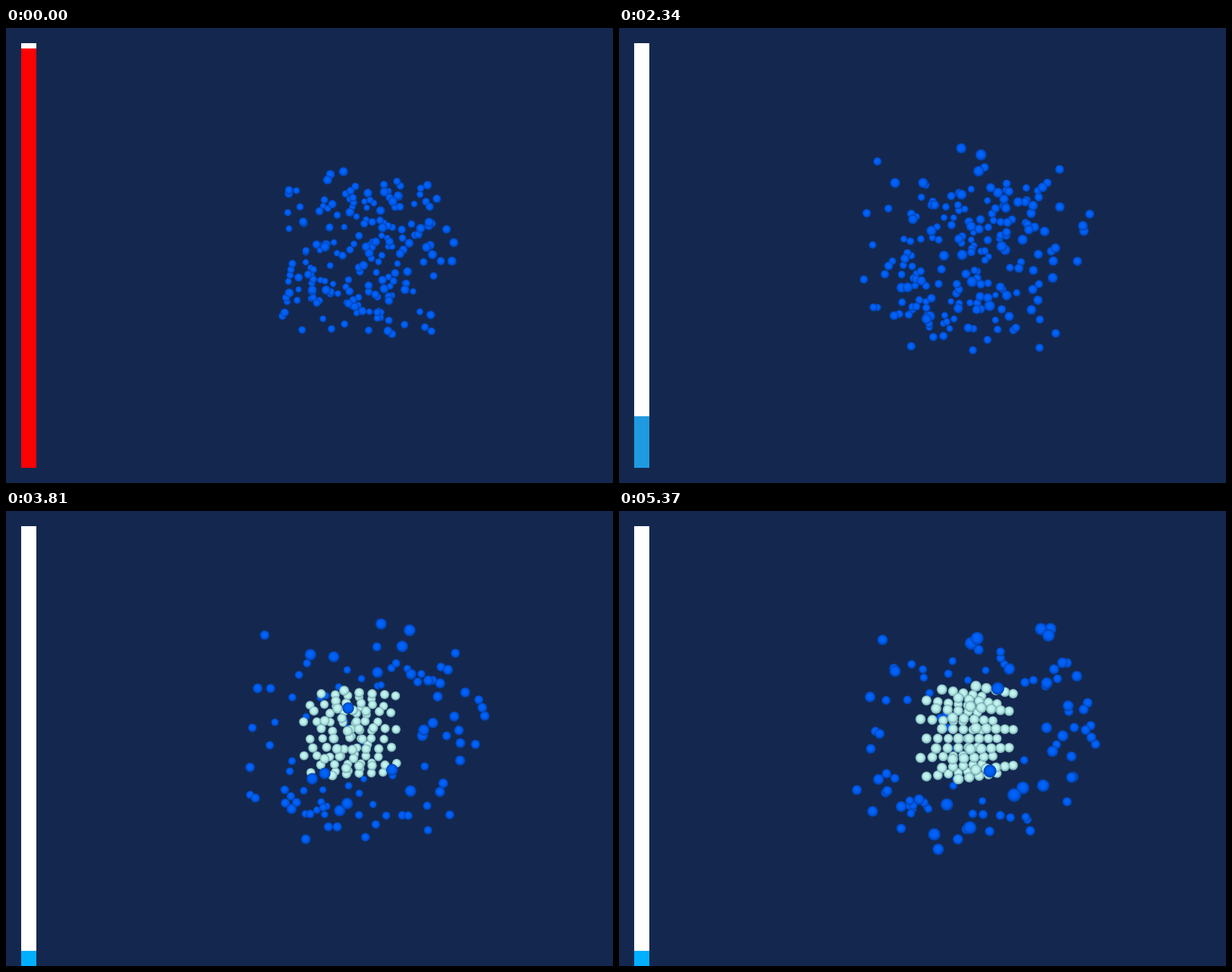
Recreate the animation shown at these times as an HTML page with a canvas. Size 800 by 600 pixels, loop 5400 ms.

```html
<!DOCTYPE html>
<html lang="en">
<head>
<meta charset="utf-8">
<title>Freezing particles</title>
<style>
  html, body { margin: 0; width: 100%; height: 100%; overflow: hidden; background: #14284f; }
  canvas { display: block; }
</style>
</head>
<body>
<canvas id="stage" width="800" height="600"></canvas>
<script>
const ctx = document.getElementById('stage').getContext('2d');
const STEP = 30, STEPS = 180, FREEZE = 89;
const FOCAL = 519.6, RADIUS = 5.3;
const COUNT = 200, HALF = 102, SPEED = 0.5, SETTLE = 0.92;

let seed = 4711;
function random() {
  seed = (seed + 0x6D2B79F5) | 0;
  let r = Math.imul(seed ^ (seed >>> 15), 1 | seed);
  r = (r + Math.imul(r ^ (r >>> 7), 61 | r)) ^ r;
  return ((r ^ (r >>> 14)) >>> 0) / 4294967296;
}
const vector = size => Array.from({ length: 3 }, () => (random() * 2 - 1) * size);
const distance = (a, b) => Math.hypot(a[0] - b[0], a[1] - b[1], a[2] - b[2]);

// The group turns about the vertical axis while it swings towards the viewer
function viewAt(n) {
  const angle = n * 0.005, cos = Math.cos(angle), sin = Math.sin(angle);
  const q = 1 - n / 85;
  return {
    cos, sin,
    x: 50.5 + (q > 0 ? 15.5 * q * q : 4.5 * Math.tanh(3 * q * q)),
    z: 46 + 120 * sin - 72 * cos
  };
}

function project([x, y, z], view) {
  const depth = view.z - x * view.sin + z * view.cos;
  const scale = FOCAL / (FOCAL - depth);
  return {
    x: 400 + (view.x + x * view.cos + z * view.sin) * scale,
    y: 300 + y * scale,
    scale
  };
}

// Velocity falls with the temperature and reverses below zero
function drift(p, n) {
  const k = (FREEZE * n - n * n / 2) / 90;
  return p.pos.map((v, i) => v + p.vel[i] * k);
}

// Staggered crystal of 4 layers, 5 rows and 5 columns
function crystal() {
  const sites = [];
  for (let layer = 0; layer < 4; layer++)
    for (let row = 0; row < 5; row++)
      for (let col = 0; col < 5; col++)
        sites.push([
          -40 + col * 20 - (row % 2) * 10,
          -40 + row * 20 - (layer % 2) * 10,
          -33 + layer * 20
        ]);
  return sites;
}

const particles = Array.from({ length: COUNT }, () => ({ pos: vector(HALF), vel: vector(SPEED) }));
for (const p of particles) p.from = drift(p, FREEZE);

// The innermost particles freeze, each on the nearest site still open
const open = crystal();
particles
  .sort((a, b) => Math.hypot(...a.from) - Math.hypot(...b.from))
  .slice(0, open.length)
  .forEach(p => {
    open.sort((a, b) => distance(a, p.from) - distance(b, p.from));
    p.target = open.shift();
  });

function positionAt(p, n) {
  if (!p.target || n < FREEZE) return drift(p, n);
  const left = Math.pow(SETTLE, n - FREEZE);
  return p.target.map((v, i) => v + (p.from[i] - v) * left);
}

function shade(inner, middle, edge) {
  const g = ctx.createRadialGradient(-0.1, -0.18, 0, 0, 0, 1);
  g.addColorStop(0, inner);
  g.addColorStop(0.6, middle);
  g.addColorStop(1, edge);
  return g;
}
const WATER = shade('#0066ff', '#005cf0', '#003fa8');
const ICE = shade('#cdf8f4', '#b5ebe8', '#74a5aa');

function drawBar(n) {
  const level = (FREEZE - n) / 90, warm = Math.max(0, level);
  ctx.fillStyle = '#fff';
  ctx.fillRect(20, 20, 20, 560);
  ctx.fillStyle = `rgb(${255 * warm}, ${176 * (1 - warm)}, ${255 * (1 - warm)})`;
  ctx.fillRect(20, 580, 20, -Math.floor(560 * level));
}

function drawBall({ x, y, scale, frozen }) {
  const r = RADIUS * scale;
  ctx.setTransform(r, 0, 0, r, x, y);
  ctx.fillStyle = frozen ? ICE : WATER;
  ctx.beginPath();
  ctx.arc(0, 0, 1, 0, Math.PI * 2);
  ctx.fill();
}

function draw(n) {
  ctx.setTransform(1, 0, 0, 1, 0, 0);
  ctx.fillStyle = '#14284f';
  ctx.fillRect(0, 0, 800, 600);
  drawBar(n);
  const view = viewAt(n);
  particles
    .map(p => ({ ...project(positionAt(p, n), view), frozen: p.target && n >= FREEZE }))
    .sort((a, b) => a.scale - b.scale)
    .forEach(drawBall);
}

const start = performance.now();
function tick() {
  const time = Math.max(0, performance.now() - start);
  draw(Math.floor(time / STEP) % STEPS);
  requestAnimationFrame(tick);
}
tick();
</script>
</body>
</html>
```
